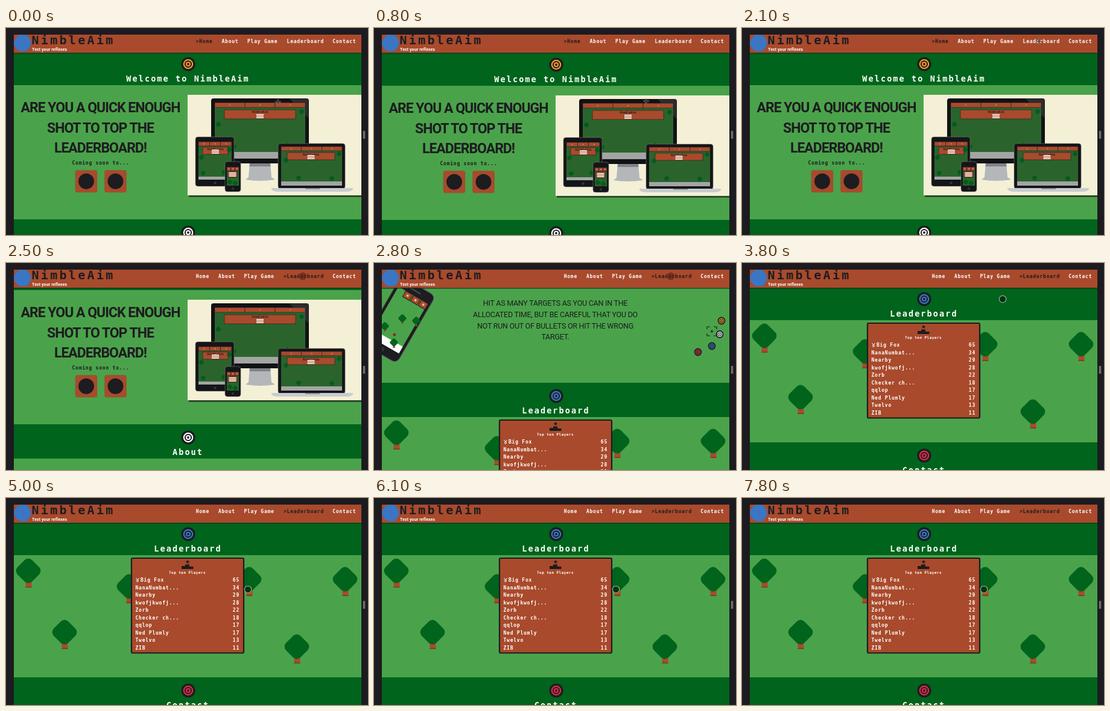
Recreate the animation shown at these times as an HTML page. Size 600 by 344 pixels, loop 7900 ms.

```html
<!DOCTYPE html>
<html lang="en">
<head>
<meta charset="utf-8">
<title>NimbleAim</title>
<style>
  html, body { margin: 0; width: 100%; height: 100%; overflow: hidden; background: #1c1b1f; }
  svg { display: block; width: 100vw; height: 100vh; }
  text { font: bold 8px "DejaVu Sans Mono", monospace; letter-spacing: .77px; fill: #fff; white-space: pre; }
  .dark { fill: #1d1c20; }
  .mid { text-anchor: middle; }
  .end { text-anchor: end; }
  .brand { font-size: 20px; letter-spacing: 3.3px; }
  .title { font-size: 13.5px; letter-spacing: 2.1px; }
  .small { font-size: 6px; letter-spacing: .45px; }
  .tiny { font-size: 5px; letter-spacing: 0; }
  .tag { font: bold 7px Roboto, sans-serif; letter-spacing: .1px; }
  .shout { font: bold 23px Roboto, sans-serif; letter-spacing: -1px; }
  .info { font: 12.5px Roboto, sans-serif; letter-spacing: -.25px; }
</style>
</head>
<body>
<svg id="stage" viewBox="0 0 600 344"></svg>
<script>
const INK = '#1d1c20', BROWN = '#a94a2c', LEAF = '#00641c', GRASS = '#4aa34a', SCREEN = '#2a642c';
const ORANGE = '#f09a2c', BLUE = '#3a76c4', RED = '#e02a4c';
const LOOP = 7900, SECTION = 280, TOP = 38;

const rect = (x, y, w, h, fill, more = '') =>
  `<rect x="${x}" y="${y}" width="${w}" height="${h}" fill="${fill}" ${more}/>`;
const disc = (x, y, r, fill, more = '') =>
  `<circle cx="${x}" cy="${y}" r="${r}" fill="${fill}" ${more}/>`;
const text = (x, y, cls, str) => `<text x="${x}" y="${y}" class="${cls}">${str}</text>`;
const path = (d, fill, more = '') => `<path d="${d}" fill="${fill}" ${more}/>`;
const group = (transform, body) => `<g transform="${transform}">${body}</g>`;

const target = (x, y, color, scale = 1) => group(`translate(${x} ${y}) scale(${scale})`,
  disc(0, 0, 11.6, INK) +
  [7.2, 3].map(r => disc(0, 0, r, 'none', `stroke="${color}" stroke-width="2.2"`)).join(''));

const bush = (x, y, side, fill = LEAF) => group(`translate(${x} ${y}) rotate(45)`,
  rect(-side / 2, -side / 2, side, side, fill, `rx="${side * .26}"`));

const tree = (x, y, size = 1) => group(`translate(${x} ${y}) scale(${size})`,
  rect(-4.5, 18, 10, 10, BROWN) + rect(-4.5, 26.5, 10, 1.5, '#7d3a22') + bush(0, 0, 34));

const section = (top, height, color, name) =>
  rect(13, top, 576, height, GRASS) + rect(13, top, 576, 57, LEAF) +
  target(302, top + 22, color) + text(301.5, top + 51, 'title mid', name);

// The game as seen on a device: three cells, a menu panel and bushes
function gameScreen(x, y, w, h, bar, floor, panel, bushes) {
  const [px, py, pw, ph] = panel, cx = px + pw / 2;
  const edge = `stroke="${INK}" stroke-width=".6"`;
  let out = rect(x, y, w, h, SCREEN) + rect(x, y + h - floor, w, floor, '#a3a5a4');
  for (let i = 0; i < 3; i++) {
    out += rect(x + i * w / 3, y, w / 3, bar, BROWN, edge) +
      disc(x + (i + .5) * w / 3, y + bar / 2, 1.1, '#d08a70');
  }
  out += rect(px, py, pw, ph, BROWN, edge);
  if (pw > 20) out += text(cx, py + 5, 'tiny mid dark', 'NimbleAim');
  for (let i = 0; i < 3; i++) out += rect(cx - 6, py + ph - 8 + i * 2.6, 12, 1.8, '#eee4dc');
  return out + bushes.map(([bx, by]) => bush(bx, by, 7, '#075a1e')).join('');
}

function devices() {
  const base = '#c9ccce';
  return rect(303, 113, 286, 168, '#2d4a2d') + rect(301, 111, 288, 167, '#f4f0d6') +
    path('M404 224H438L440 248L446 252Q421 256 397 252L402 248Z', '#b4b7ba') +
    path('M404 224H438L438.500 230H403.500Z', '#808488') +
    rect(340, 117, 162, 108, '#111215', 'rx="4"') +
    path('M470 117.500H498Q501.500 117.500 501.500 122V150Z', '#2b2c30') +
    gameScreen(346, 124, 150, 93, 8, 11, [362, 136, 118, 15],
      [[352, 160], [378, 197], [490, 139], [466, 194]]) +
    rect(314, 181, 64, 82, '#141518', 'rx="4" stroke="#777" stroke-width=".6"') +
    gameScreen(319, 189, 55, 63, 7, 5, [326, 198, 42, 12],
      [[324, 215], [327, 241], [370, 202], [361, 240]]) +
    disc(346.5, 257.5, 2.3, '#33343a') +
    rect(451, 192, 111, 75, '#141518', 'rx="4" stroke="#777" stroke-width=".6"') +
    gameScreen(456, 197, 101, 65, 7, 7, [466, 207, 79, 12],
      [[464, 220], [552, 209], [485, 249], [540, 250]]) +
    path('M440 266H575V268Q573 272 564 272H451Q442 272 440 268Z', base) +
    rect(496, 266, 24, 2, '#909396') +
    rect(363, 222, 26, 50, '#141518', 'rx="4" stroke="#777" stroke-width=".6"') +
    gameScreen(366, 231, 20, 31, 6, 0, [368, 238, 15, 10], [[371, 256], [380, 258]]) +
    disc(376, 267, 2, '#33343a');
}

function home() {
  const lines = ['ARE YOU A QUICK ENOUGH', 'SHOT TO TOP THE', 'LEADERBOARD!'];
  return section(TOP, SECTION, ORANGE, 'Welcome to NimbleAim') +
    lines.map((s, i) => text(156.5, 140 + i * 33.6, 'shout mid dark', s)).join('') +
    text(157, 227, 'mid dark', 'Coming soon to...') +
    [115, 163.5].map(x => rect(x, 236.5, 36, 36.5, BROWN, 'rx="3" stroke="#8a5a34" stroke-width=".7"') +
      disc(x + 18, 254.700, 13, INK)).join('') +
    devices();
}

function about() {
  const lines = ['HIT AS MANY TARGETS AS YOU CAN IN THE',
    'ALLOCATED TIME, BUT BE CAREFUL THAT YOU DO',
    'NOT RUN OUT OF BULLETS OR HIT THE WRONG', 'TARGET.'];
  const phone = group('translate(102 50) rotate(30)',
    rect(-66, 0, 66, 129, INK, 'rx="9" stroke="#55565a"') +
    rect(-43, 8, 20, 2.5, '#47484c', 'rx="1"') +
    rect(-61, 17, 56, 96, GRASS) + rect(-61, 100, 56, 13, '#fff') +
    [-47, -32, -17].map(x => rect(x, 17, 13, 11, BROWN, `stroke="${INK}"`) +
      disc(x + 6.5, 22.5, 2, '#e6b8a4')).join('') +
    disc(-33, 121, 4, '#303136'));
  const bushes = [[47, 87], [70, 91], [18, 100], [33, 127]].map(([x, y]) => tree(x, y, .32)).join('');
  const aim = path('M552 105V101H557M563 101H568V105M568 112V116H563M557 116H552V112M557.500 108.500H562.500M560 106V111',
    'none', `stroke="${INK}" stroke-width="1.2"`);
  return section(TOP + SECTION, SECTION, '#fff', 'About') +
    group('translate(0 404)',
      lines.map((s, i) => text(300.5, 66 + i * 18.8, 'info mid dark', s)).join('') +
      phone + bushes + disc(34, 114, 2.5, '#8c3028') +
      target(576, 91, ORANGE, .55) + target(573, 113.5, '#fff', .55) +
      target(560, 133, BLUE, .55) + target(537, 143, RED, .55) + aim);
}

function leaderboard() {
  const players = [['Big Fox', 65], ['NanaNumbat...', 34], ['Nearby', 29], ['kwofjkwofj...', 28],
    ['Zorb', 22], ['Checker ch...', 18], ['qqlop', 17], ['Ned Plumly', 17], ['Twelvo', 13], ['ZIB', 11]];
  const trees = [[37, 121], [204, 147], [403, 135], [562, 135], [97, 223], [482, 247]];
  const rows = players.map(([name, score], i) => {
    const y = 139 + i * 12.5;
    return text(i ? 214.5 : 223, y, '', name) + text(387, y, 'end', score);
  }).join('');
  const cup = path('M215.500 133L218 136.500L220.500 133M218 136.500V137', 'none', 'stroke="#fff"') +
    disc(218, 137.8, 1.5, 'none', 'stroke="#fff"');
  const podium = path('M291 118V113H297V110.500H304V114H310.500V118Z', INK) +
    path('M301 102.500L302 105H304.500L302.500 106.500L303.300 109L301 107.500L298.700 109L299.500 106.500L297.500 105H300Z', INK);
  return section(TOP + 2 * SECTION, 260, BLUE, 'Leaderboard') +
    group(`translate(0 ${2 * SECTION})`,
      trees.map(([x, y]) => tree(x, y)).join('') +
      rect(208, 100, 186, 157.5, BROWN, `rx="2" stroke="${INK}" stroke-width="2.2"`) +
      podium + text(300.5, 125.5, 'small mid', 'Top ten Players') + cup + rows);
}

const nav = [['Home', 320.3], ['About', 357.5], ['Play Game', 400], ['Leaderboard', 465.6], ['Contact', 541.2]];

document.getElementById('stage').innerHTML =
  '<defs><clipPath id="window"><rect x="13" y="11" width="576" height="333"/></clipPath></defs>' +
  rect(0, 0, 600, 344, '#1c1b1f') +
  '<g clip-path="url(#window)"><g id="page">' +
  home() + about() + leaderboard() + section(858, SECTION, RED, 'Contact') + '</g>' +
  rect(13, 40, 576, 3, '#17351c', 'opacity=".65"') + rect(13, 11, 576, 30, BROWN) +
  disc(27.5, 25, 14, BLUE) + text(42.5, 27, 'brand dark', 'NimbleAim') +
  text(43, 37.5, 'tag', 'Test your reflexes') +
  nav.map(([name]) => text(0, 25.3, 'link', name)).join('') +
  '</g>' + rect(592, 171, 1, 13, '#aaa') + rect(594, 171, 1, 13, '#aaa') +
  '<g id="cursor">' +
  '<g id="cross" fill="none"><path d="M-4.500 0H4.500M0-4.500V4.500" stroke="#bbb" stroke-width="2.4" opacity=".6"/>' +
  `<path d="M-4 0H4M0-4V4" stroke="${INK}"/></g>` +
  '<circle id="dot" r="5.7" stroke-width="1.1"/></g>';

const [page, cursor, cross, dot] = ['page', 'cursor', 'cross', 'dot'].map(id => document.getElementById(id));
const links = document.querySelectorAll('.link');

const clamp = v => Math.min(1, Math.max(0, v));
const ease = u => u * u * (3 - 2 * u);

// Pointer stops: time, x, y
const stops = [[0, 451, 123], [300, 451, 123], [500, 451, 121.5], [900, 451, 121.5], [2000, 492, 22],
  [3300, 492, 22], [3800, 432, 60], [4700, 401, 152], [LOOP, 401, 152]];

function pointer(t) {
  const i = stops.findIndex(s => s[0] > t);
  const [t0, x0, y0] = stops[i - 1], [t1, x1, y1] = stops[i];
  const u = ease((t - t0) / (t1 - t0));
  return [x0 + (x1 - x0) * u, y0 + (y1 - y0) * u];
}

function draw(t) {
  const nudge = t >= 400 && t < 1500 ? 1 : 0;
  const scroll = Math.round(2 * SECTION * ease(clamp((t - 2380) / 650)));
  page.setAttribute('transform', `translate(0 ${nudge - scroll})`);

  const clicked = t >= 2400, active = clicked ? 3 : 0;
  links.forEach((link, i) => {
    const on = i === active, shift = on || (clicked && i < active) ? 5.6 : 0;
    link.textContent = (on ? '>' : '') + nav[i][0];
    link.setAttribute('x', nav[i][1] - shift);
    link.classList.toggle('dark', on);
  });

  cursor.setAttribute('transform', `translate(${pointer(t)})`);
  cross.style.display = clicked ? 'none' : '';
  dot.style.display = clicked ? '' : 'none';
  const overHeader = t < 3500;
  dot.setAttribute('fill', overHeader ? 'rgba(90,30,24,.6)' : 'rgba(6,44,16,.88)');
  dot.setAttribute('stroke', overHeader ? '#7a2c22' : '#9db8a0');
}

function tick(now) {
  draw(Math.floor(now % LOOP / 100) * 100);
  requestAnimationFrame(tick);
}
tick(performance.now());
</script>
</body>
</html>
```
